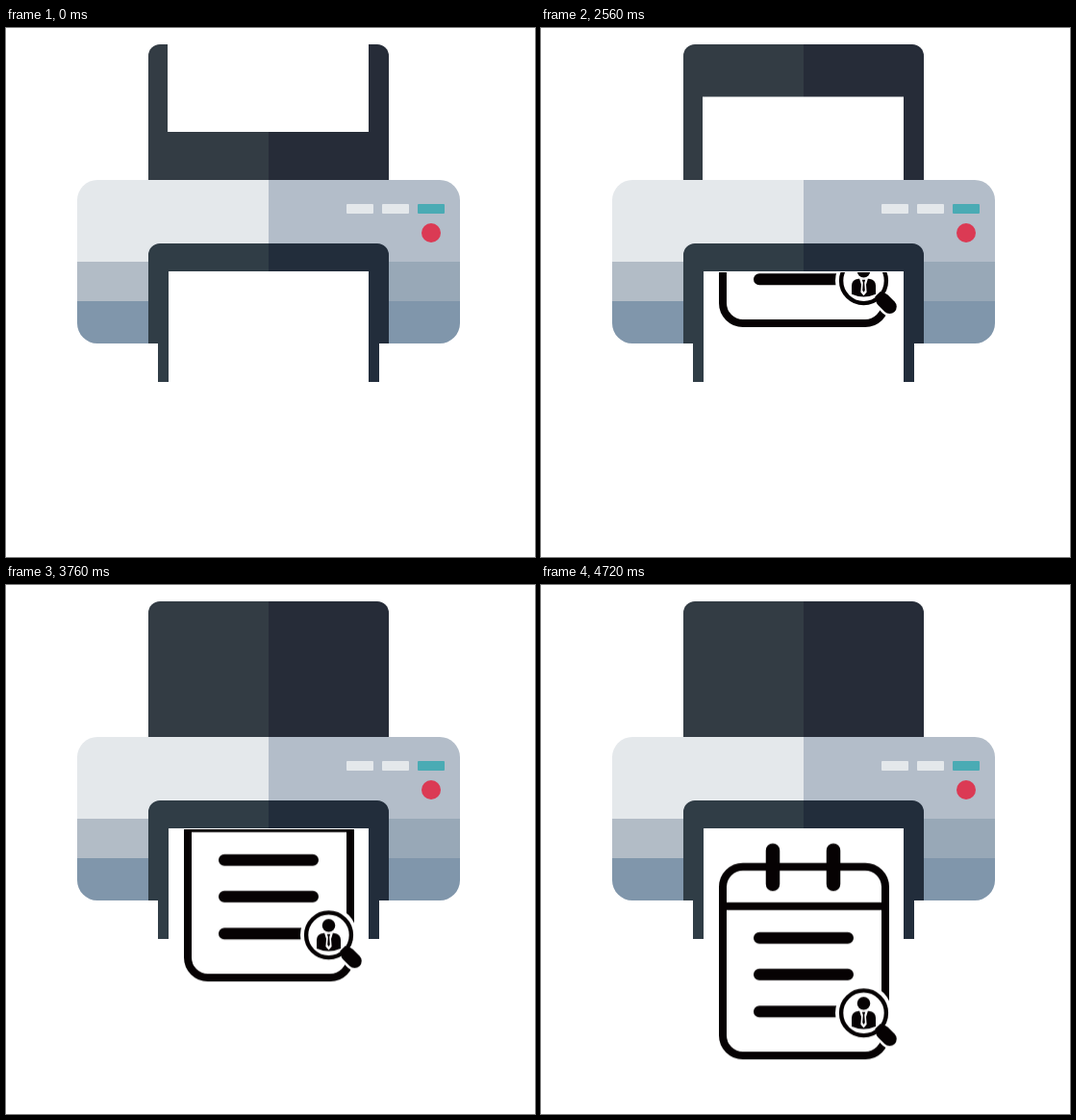
These frames come from a looping animation (550 px wide and 550 px high, 4.8 s). An HTML page:

```html
<!DOCTYPE html>
<html lang="en">
<head>
<meta charset="utf-8">
<title>Printer</title>
<style>
  html, body { margin: 0; width: 100%; height: 100%; overflow: hidden; background: #fff; }
  svg { display: block; width: 100vw; height: 100vh; }
  .feed { animation: feed 4800ms steps(60, end) infinite; }
  @keyframes feed {
    from { transform: translateY(0); }
    to { transform: translateY(405px); }
  }
  .ink { fill: none; stroke: #060203; }
  .solid { fill: #060203; }
  .white { fill: #fff; }
  .round { stroke-linecap: round; }
</style>
</head>
<body>
<svg viewBox="0 0 550 550">
  <defs>
    <clipPath id="body"><rect x="74" y="158" width="398" height="170" rx="21"/></clipPath>
    <clipPath id="outlet"><rect x="169" y="254.5" width="208" height="296"/></clipPath>
  </defs>

  <!-- tray -->
  <path fill="#333c44" d="M148 158V29a12 12 0 0 1 12-12H273V158Z"/>
  <path fill="#262c38" d="M273 158V17H386a12 12 0 0 1 12 12V158Z"/>

  <!-- blank sheet -->
  <rect class="feed white" x="168" y="-144.5" width="209" height="252.5"/>

  <!-- body -->
  <g clip-path="url(#body)" shape-rendering="crispEdges">
    <rect x="74" y="158" width="199" height="85" fill="#e4e8eb"/>
    <rect x="273" y="158" width="199" height="85" fill="#b3bdc9"/>
    <rect x="74" y="243" width="199" height="41" fill="#b2bcc6"/>
    <rect x="273" y="243" width="199" height="41" fill="#98a8b7"/>
    <rect x="74" y="284" width="398" height="44" fill="#8096ab"/>
  </g>
  <g fill="#e4e8eb">
    <rect x="354" y="183" width="28" height="10" rx="1"/>
    <rect x="391" y="183" width="28" height="10" rx="1"/>
    <rect x="428" y="183" width="28" height="10" rx="1" fill="#4aabb4"/>
  </g>
  <circle cx="442" cy="213" r="10" fill="#db3a54"/>

  <!-- outlet -->
  <rect class="white" x="158" y="253" width="230" height="115"/>
  <path fill="#303d46" d="M273 224H160a12 12 0 0 0-12 12V328H158V368H169V253H273Z"/>
  <path fill="#222d3b" d="M273 224H386a12 12 0 0 1 12 12V328H388V368H377V253H273Z"/>

  <!-- printed page -->
  <g clip-path="url(#outlet)">
    <g class="feed">
      <g transform="translate(0 -398.25)">
        <rect class="ink" x="189" y="293" width="169" height="196.25" rx="21" stroke-width="8"/>
        <path class="ink" d="M189 334H358" stroke-width="8"/>
        <path class="ink round" d="M241 276V311M304 276V311" stroke-width="14.5"/>
        <path class="ink round" d="M227 367H319M227 405H319M227 443.5H319" stroke-width="12"/>

        <!-- magnifier -->
        <path class="round" d="M354 463L362.5 472" stroke="#fff" stroke-width="20"/>
        <circle class="white" cx="335.5" cy="445" r="29.5"/>
        <path class="ink" d="M350 459L357 466" stroke-width="8"/>
        <path class="ink round" d="M355.5 465L362.5 472" stroke-width="14.5"/>
        <circle class="ink" cx="335.5" cy="445" r="23.4" stroke-width="4.4"/>

        <!-- person -->
        <circle class="solid" cx="335.5" cy="435" r="6.8"/>
        <path class="solid" d="M323 459V450Q323 444 330 443H341Q348 444 348 450V459Q335.5 464.5 323 459Z"/>
        <path class="white" d="M331 442.5H340L338 449L338.6 457L335.5 460.5L332.4 457L333 449Z"/>
        <path class="solid" d="M333.8 444H337.2L336.2 447L336.8 455L335.5 457L334.2 455L334.8 447Z"/>
      </g>
    </g>
  </g>
</svg>
</body>
</html>
```
